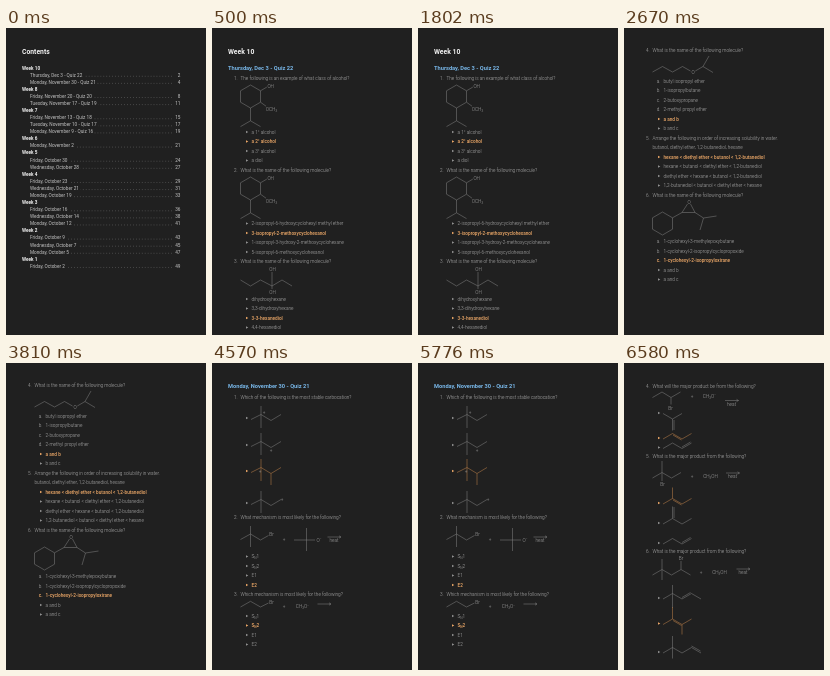
Recreate the animation shown at these times as an HTML page. Size 200 px wide and 307 px high, loop 8 s.

```html
<!DOCTYPE html>
<html lang="en">
<head>
<meta charset="utf-8">
<title>Chemistry quizzes</title>
<style>
html, body { margin: 0; height: 100%; overflow: hidden; background: #202020; }
svg { display: block; width: 100vw; height: 100vh; }
text { font: 300 4.7px Roboto, sans-serif; fill: #b4b4b4; white-space: pre; }
path { fill: none; stroke: #7d7d7d; stroke-width: .55; }
.row { font-weight: 400; fill: #c4c4c4; }
.num { text-anchor: end; }
.week { font-weight: 700; fill: #f2f2f2; }
.title { font-size: 6.8px; font-weight: 700; fill: #f2f2f2; }
.quiz { font-size: 5.7px; font-weight: 700; fill: #79b8ea; }
.right { font-weight: 500; fill: #eea968; }
.atom { text-anchor: middle; fill: #a8a8a8; }
.mark { fill: #929292; stroke: none; }
.right.mark { fill: #eea968; }
path.hot { stroke: #b77d48; }
.dots { stroke: #8c8c8c; stroke-width: .6; stroke-dasharray: .6 2.35; }
</style>
</head>
<body>
<svg id="stage" viewBox="0 0 200 307"></svg>
<script>
const STEP = 9.5;
const text = (x, y, s, cls = '') => `<text class="${cls}" x="${x}" y="${y + 1.7}">${s}</text>`;
const atom = (x, y, s) => text(x, y, s, 'atom');
const line = (d, cls = '') => `<path class="${cls}" d="${d}"/>`;
const mark = (y, cls = '') => line(`M34 ${y - 1.2}l2.3 1.2-2.3 1.2z`, cls + ' mark');
const sub = s => `<tspan font-size="3.2" dy=".9">${s}</tspan><tspan dy="-.9">\u200b</tspan>`;
const sup = s => `<tspan font-size="3.4" dy="-1.5">${s}</tspan>`;
const question = (y, n, s) => text(22, y, n + '.') + text(28.5, y, s);
const arrow = (x, y) => line(`M${x} ${y}h13.5m-2 -1.2l2 1.2-2 1.2`);
const CH3O = 'CH' + sub(3) + 'O';

// Answer list; the first `lettered` items carry letters, the rest a triangle.
function answers(y, items, right, lettered = 0) {
  return items.map((s, i) => {
    const cls = i === right ? 'right' : '', at = y + i * STEP;
    const tag = i < lettered ? text(32.7, at, 'abcd'[i] + '.', cls) : mark(at, cls);
    return tag + text(39.5, at, s, cls);
  }).join('');
}

const ring = (x, y) => line(`M${x} ${y}l10 5.8v11.4l-10 5.8-10-5.8v-11.4z`);

const ether = y => ring(38.5, y) +
  line(`M48.5 ${y + 5.8}l6.3-3.7M48.5 ${y + 17.2}l5.5 4M38.5 ${y + 23}v12.8l-10 5.8m10-5.8l10 5.8`) +
  atom(58.7, y + .8, 'OH') + atom(59.5, y + 24, 'OCH' + sub(3));

const contents = () => {
  const weeks = [
    [10, 'Thursday, Dec 3 - Quiz 22', 2, 'Monday, November 30 - Quiz 21', 4],
    [8, 'Friday, November 20 - Quiz 20', 8, 'Tuesday, November 17 - Quiz 19', 11],
    [7, 'Friday, November 13 - Quiz 18', 15, 'Tuesday, November 10 - Quiz 17', 17, 'Monday, November 9 - Quiz 16', 19],
    [6, 'Monday, November 2', 21],
    [5, 'Friday, October 30', 24, 'Wednesday, October 28', 27],
    [4, 'Friday, October 23', 29, 'Wednesday, October 21', 31, 'Monday, October 19', 33],
    [3, 'Friday, October 16', 36, 'Wednesday, October 14', 38, 'Monday, October 12', 41],
    [2, 'Friday, October 9', 43, 'Wednesday, October 7', 45, 'Monday, October 5', 47],
    [1, 'Friday, October 2', 49]
  ];
  let y = 39.8, out = text(16, 24.6, 'Contents', 'title');
  const next = () => (y += 7.08) - 7.08;
  for (const [week, ...rows] of weeks) {
    out += text(16, next(), 'Week ' + week, 'week');
    for (let i = 0; i < rows.length; i += 2) {
      const at = next();
      out += text(24, at, rows[i], 'row entry') + text(174.5, at, rows[i + 1], 'row num');
    }
  }
  return out;
};

const alcohols = () =>
  text(16, 24.3, 'Week 10', 'title') + text(16, 40.5, 'Thursday, Dec 3 - Quiz 22', 'quiz') +
  question(50, 1, 'The following is an example of what class of alcohol?') + ether(57) +
  answers(104, ['a 1° alcohol', 'a 2° alcohol', 'a 3° alcohol', 'a diol'], 1) +
  question(142, 2, 'What is the name of the following molecule?') + ether(149) +
  answers(195.5, ['2-isopropyl-6-hydroxycyclohexyl methyl ether', '3-isopropyl-2-methoxycyclohexanol',
    '1-isopropyl-3-hydroxy-2-methoxycyclohexane', '5-isopropyl-6-methoxycyclohexanol'], 1) +
  question(233.5, 3, 'What is the name of the following molecule?') +
  line('M28.5 252l10 6 10-6 11.5 6 10-6 10 6M60 244v17') +
  atom(60.5, 241, 'OH') + atom(60.5, 264.5, 'OH') +
  answers(271, ['dihydroxyhexane', '3,3-dihydroxyhexane', '3-3-hexanediol', '4,4-hexanediol'], 2);

const ethers = () => {
  const names = ['hexane', 'diethyl ether', 'butanol', '1,2-butanediol'];
  const order = s => [...s].map(i => names[i]).join(' &lt; ');
  return question(22.5, 4, 'What is the name of the following molecule?') +
    line('M28.5 44l10-5.5 10 5.5 10-5.5 8 4.5M71.3 43l7.7-4.5 10 6M79 38.5l6-10.5') + atom(69, 44.5, 'O') +
    answers(53, ['butyl isopropyl ether', '1-isopropylbutane', '2-butoxypropane', '2-methyl propyl ether',
      'a and b', 'b and c'], 4, 4) +
    question(110, 5, 'Arrange the following in order of increasing solubility in water.') +
    text(28.5, 119.5, 'butanol, diethyl ether, 1,2-butanediol, hexane') +
    answers(129, ['0123', '0213', '1023', '3210'].map(order), 0) +
    question(167, 6, 'What is the name of the following molecule?') +
    ring(38.5, 184) +
    line('M48.5 189.8l9.5-5.3h13l8.5 5.5 13-2M79.5 190l-3.5 12M58 184.5l5.5-8.5M71 184.5l-4.5-8.5') +
    atom(65, 174, 'O') +
    answers(213.5, ['1-cyclohexyl-3-methylepoxybutane', '1-cyclohexyl-2-isopropylcyclopropoxide',
      '1-cyclohexyl-2-isopropyloxirane', 'a and b', 'a and c'], 2, 3);
};

const chain = 'l10-5 10 6 10-6';
const cation = (y, px, py, cls = '', extra = '') =>
  mark(y, cls && 'right') + line(`M39 ${y + 1.5}${chain}M49 ${y - 12}v22${extra}`, cls) + atom(px, py, '+');

const kinetics = () => {
  const kinds = ['S' + sub('N') + '1', 'S' + sub('N') + '2', 'E1', 'E2'];
  return text(16, 23.5, 'Monday, November 30 - Quiz 21', 'quiz') +
    question(34, 1, 'Which of the following is the most stable carbocation?') +
    cation(55, 52, 49.5) + cation(82, 59, 87.5) +
    cation(108, 48, 108, 'hot', 'M59 110.5v11.5') + cation(140, 70, 136.5) +
    question(154, 2, 'What mechanism is most likely for the following?') +
    line('M28.5 176.5l10-5.5 10 6 8-4.5M38.5 163v21M82 177h21M94.5 165v23') +
    atom(59.5, 171, 'Br') + atom(72, 176, '+') + atom(107, 177, 'O' + sup('−')) +
    arrow(115.5, 174) + atom(122, 177.5, 'heat') +
    answers(193.5, kinds, 3) +
    question(231.5, 3, 'Which mechanism is most likely for the following?') +
    line('M28.5 244l10-5.7 10 5.7 8-4') + atom(59.5, 239, 'Br') + atom(72, 243.5, '+') +
    atom(90.5, 243.5, CH3O + sup('−')) + arrow(105.5, 241) +
    answers(253, kinds, 1);
};

const zigzag = (y, cls = '', extra = '') =>
  mark(y, cls && 'right') + line(`M39 ${y + 1}l9.5-5.5 9.5 5.5 9.5-5.5${extra}`, cls);
const double = (x, y, dx, dy) => `M${x} ${y}l${dx} ${dy}`;

const products = () =>
  question(23, 4, 'What will the major product be from the following?') +
  line('M28.5 34.5l9.5-5.5 9 5.5 9.5-5.5M47 34.5v7') + atom(46.5, 45, 'Br') +
  atom(68, 33, '+') + atom(85.5, 33, CH3O + sup('−')) + arrow(101, 37.5) + atom(107.5, 41, 'heat') +
  mark(50) + line('M39 50.5l9.5 5.5 9.5-5.5M48.5 56v11.5M50 57v10') +
  zigzag(75, 'hot', double(49, 72, 8.5, 5)) + zigzag(84.5, '', double(58, 84, 8.5, -5)) +

  question(93.5, 5, 'What is the major product from the following?') +
  line('M28.5 115l9.5-5.5 9.5 5.5 9.5-5.5M38 98v20') + atom(38.5, 121, 'Br') +
  atom(68, 113, '+') + atom(86.5, 113, CH3O + 'H') + arrow(102, 110) + atom(108.5, 113.5, 'heat') +
  zigzag(140, 'hot', 'M48.5 135.5v-11' + double(49, 137, 8.5, 5)) +
  zigzag(160, '', 'M48.5 155.5v-12M50 155v-11') +
  zigzag(180, '', double(58, 179.5, 8.5, -5)) +

  question(188.5, 6, 'What is the major product from the following?') +
  line('M28.5 212l9.5-5.5 9.5 5.5 9.5-5.5 9.5 5.5M38 196v21M57 206.5v-8.5') + atom(57, 195.5, 'Br') +
  atom(77, 209.5, '+') + atom(95.5, 209.5, CH3O + 'H') + arrow(112.5, 206) + atom(119, 209, 'heat') +
  zigzag(235, '', 'l9.5 5.5M48.5 222v23' + double(58, 234.5, 8.5, -5)) +
  zigzag(260.5, 'hot', 'M48.5 256v-12M58 261.5v10' + double(49, 257.5, 8.5, 5)) +
  zigzag(289, '', 'l9.5 5.5M48.5 273v22.5' + double(67.5, 283, 9, 5));

const pages = [contents, alcohols, ethers, kinetics, products];
const starts = [0, 500, 2670, 4570, 6580];
const stage = document.getElementById('stage');
stage.innerHTML = pages.map(page => `<g>${page()}</g>`).join('');

// Dot leaders run from each entry to a shared right edge.
for (const entry of stage.querySelectorAll('.entry')) {
  const from = 24 + entry.getComputedTextLength() + 1.5;
  entry.insertAdjacentHTML('afterend', line(`M166 ${entry.getAttribute('y') - .3}H${from}`, 'dots'));
}

function show(now) {
  const t = now % 8000;
  const current = starts.findLastIndex(start => t >= start);
  [...stage.children].forEach((g, i) => g.style.visibility = i === current ? 'visible' : 'hidden');
  requestAnimationFrame(show);
}
show(performance.now());
</script>
</body>
</html>
```
